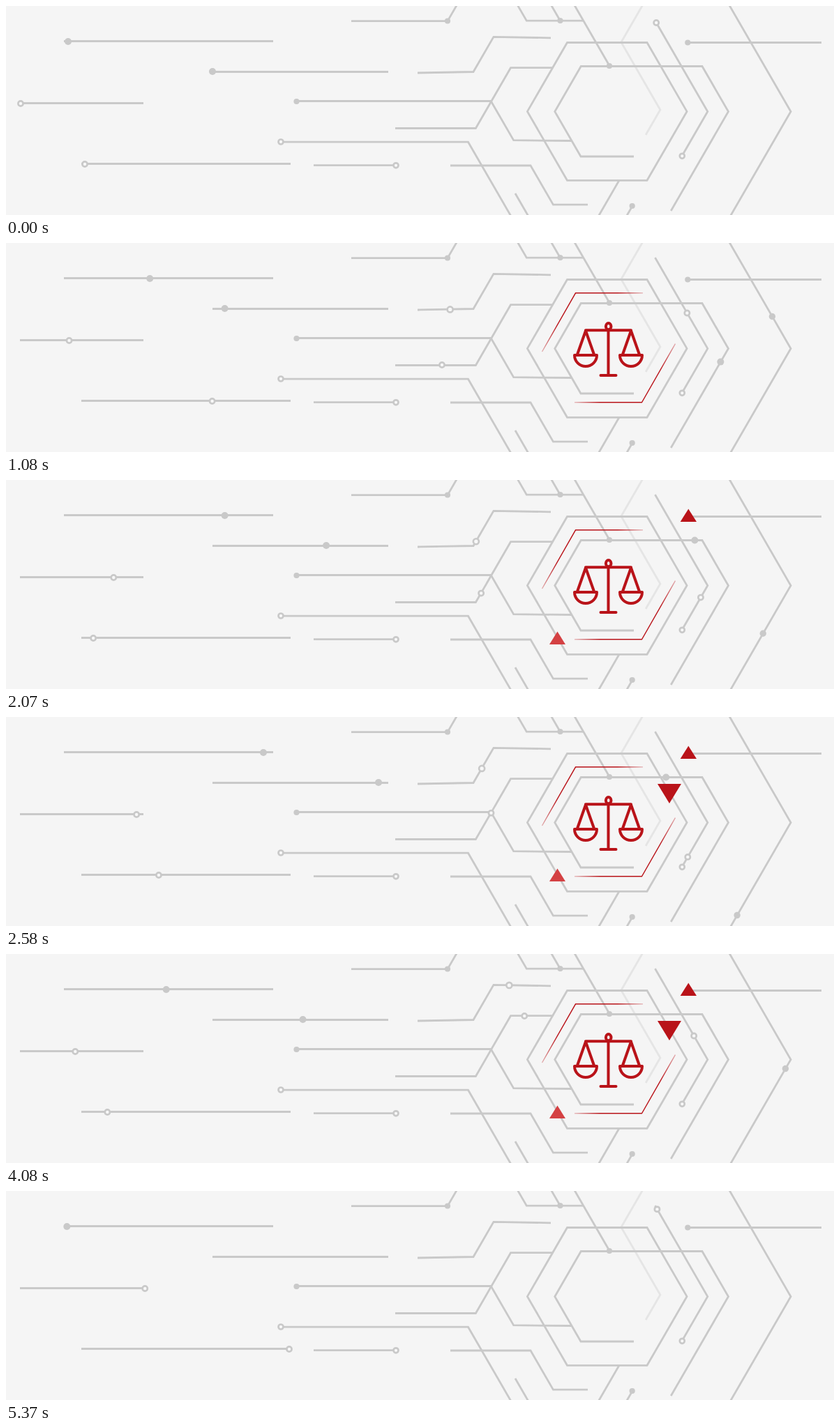
Recreate the animation shown at these times as an HTML page. Size 1187 by 300 pixels, loop 5400 ms.

```html
<!DOCTYPE html>
<html lang="en">
<head>
<meta charset="utf-8">
<title>Circuit lines with scales</title>
<style>
html, body { margin: 0; width: 100%; height: 100%; overflow: hidden; background: #f5f5f5; }
svg { display: block; width: 1187px; height: 300px; }
polyline { fill: none; stroke: #c9c9c9; stroke-width: 2.8; }
.faint { stroke: #e5e5e5; }
.dot { fill: #c9c9c9; }
.ring { fill: #f8f8f8; stroke: #c9c9c9; stroke-width: 2.7; }
.icon { fill: none; stroke: #b91319; stroke-width: 4; stroke-linecap: round; stroke-linejoin: round; }
.trim { fill: none; stroke: url(#fade); stroke-width: 1.4; }
.tri { fill: #b91319; }
.pale { fill: #d44143; }
</style>
</head>
<body>
<svg viewBox="0 0 1187 300">
  <defs>
    <linearGradient id="fade" gradientUnits="userSpaceOnUse" x1="768" x2="913" y1="0" y2="0">
      <stop offset="0" stop-color="#b91319" stop-opacity=".3"/>
      <stop offset=".15" stop-color="#b91319"/>
      <stop offset=".75" stop-color="#b91319"/>
      <stop offset="1" stop-color="#b91319" stop-opacity=".25"/>
    </linearGradient>
  </defs>
  <g id="board"></g>
  <g id="emblem">
    <path id="trim" class="trim" d="M768.500 156L816.500 71.800H913"/>
    <use href="#trim" transform="rotate(180 864 150.300)"/>
    <g class="icon">
      <ellipse cx="863.700" cy="119.700" rx="3.800" ry="4.600"/>
      <path d="M831 125.300H896M863.500 125V190M852.500 190H874.500"/>
      <path id="pan" d="M819 160L831 126L843 160M815 161H847A16 16 0 0 1 815 161Z"/>
      <use href="#pan" x="65"/>
    </g>
  </g>
  <path class="tri pale" d="M790.500 217.500L802 236H779Z"/>
  <path class="tri" d="M978.300 41.500L990 60H966.700Z"/>
  <path class="tri" d="M934 96H968L951 124Z"/>
</svg>
<script>
const LOOP = 5400, STEP = 30, SLOPE = Math.sqrt(3);
const board = document.getElementById('board');
const emblem = document.getElementById('emblem');

function add(tag, attrs) {
  const el = document.createElementNS('http://www.w3.org/2000/svg', tag);
  for (const name in attrs) el.setAttribute(name, attrs[name]);
  return board.appendChild(el);
}

// A route starts at "x,y"; H goes level to x, R and L run at 60 degrees
// to the right or left until y, T goes straight to "x,y".
function route(text) {
  const points = [];
  let x, y;
  for (const word of text.split(' ')) {
    const kind = word[0], value = Number(word.slice(1));
    if (kind === 'H') {
      x = value;
    } else if (kind === 'R' || kind === 'L') {
      x += (kind === 'R' ? 1 : -1) * Math.abs(value - y) / SLOPE;
      y = value;
    } else {
      [x, y] = word.replace('T', '').split(',').map(Number);
    }
    points.push([x, y]);
  }
  return points;
}

const wire = (text, cls = '') => add('polyline', { points: route(text).join(' '), class: cls });
const node = (cls, r, at) => {
  const [[cx, cy]] = route(at);
  return add('circle', { class: cls, r, cx, cy });
};

wire('912.5,-1 L52 R149 L185', 'faint');
[
  '83,50.5 H383', '296,94.5 H548', '20,139.5 H197', '108,226.5 H408',
  '441,228.7 H559', '416,136.5 H696', '977,52.5 H1169',
  '394,195.2 H662.5 R301', '495,21.7 H633 R-1', '590,96 T670,94.5 R44.3 T781,45.8',
  '783,88.7 H723.5 L175.5 H558', '695.5,137 R192.7 T811,193.5',
  '637,229 H752 R285.2 H834', '730,269 R301',
  '860,52.5 H919 R151.4 L250.3 H804.5 L151.4 R52.5 H860',
  '900,216 H824 L151.5 R86.5 H998 R151.5 L294',
  '879,250.3 L301', '898,287 L301', '733.5,-1 R21.2 H828', '781.7,-1 R21',
  '815,-1 R86', '930.5,21 R151.5 L215', '1037,-1 R151.5 L301'
].forEach(text => wire(text));

['633,21.5', '794.5,21', '865,86', '977.3,52.5', '416.5,137', '897.7,287']
  .forEach(at => node('dot', 4.1, at));
['394,195', '559,228.8', '969.3,215.3'].forEach(at => node('ring', 3.5, at));

// Each run lists the times at which the corners of the route are reached.
function mover(cls, r, text, ...runs) {
  return { el: node(cls, r, text.split(' ')[0]), points: route(text), runs };
}
const movers = [
  mover('dot', 5, '89,51 H382 H84', [0, 2700, 5400]),
  mover('dot', 5, '296,94 H548', [0, 906], [960, 2675], [2834, 5258]),
  mover('ring', 3.6, '21,140 H200', [0, 2780], [3070, 5380]),
  mover('ring', 3.6, '113,227 H408', [0, 1745], [2004, 3608], [3920, 5380]),
  mover('ring', 4, '590,96 T670,95 R44.5 T781,46', [30, 1830, 3630, 5290]),
  mover('ring', 3.6, '557,175 H674 R89 H784', [60, 1815, 3585, 5110]),
  mover('ring', 3.6, '932.2,24 R151.5 L208.5 R151.5 L24', [0, 1800, 2700, 3600, 5400]),
  mover('dot', 5, '954,292.5 R151.5 L86.5 H865', [60, 1240, 1940, 3585]),
  mover('dot', 4.7, '1034,-6 R151.5 L306', [0, 1525, 2750], [2790, 3970, 5270])
];

function place({ el, points, runs }, t) {
  const run = runs.find(r => t >= r[0] && t <= r[r.length - 1]);
  el.style.display = run ? '' : 'none';
  if (!run) return;
  const i = run.findIndex((end, n) => n > 0 && t <= end);
  const p = (t - run[i - 1]) / (run[i] - run[i - 1]);
  ['cx', 'cy'].forEach((name, k) => {
    const from = points[i - 1][k];
    el.setAttribute(name, from + (points[i][k] - from) * p);
  });
}

const ramp = (t, a, b) => Math.min(1, Math.max(0, (t - a) / (b - a)));
const triangles = document.querySelectorAll('.tri');

function draw(t) {
  movers.forEach(m => place(m, t));
  const enter = ramp(t, 390, 990), stay = 1 - ramp(t, 5040, 5310);
  emblem.setAttribute('opacity', enter * stay);
  emblem.setAttribute('transform', `translate(${-28 * (1 - enter)} 0)`);
  triangles.forEach((tri, i) => {
    const start = 1200 + 450 * i;
    tri.setAttribute('opacity', ramp(t, start, start + 270) * stay);
  });
}

const begin = performance.now();
function tick() {
  const t = (performance.now() - begin) % LOOP;
  draw(Math.floor(t / STEP) * STEP);
  requestAnimationFrame(tick);
}
tick();
</script>
</body>
</html>
```
